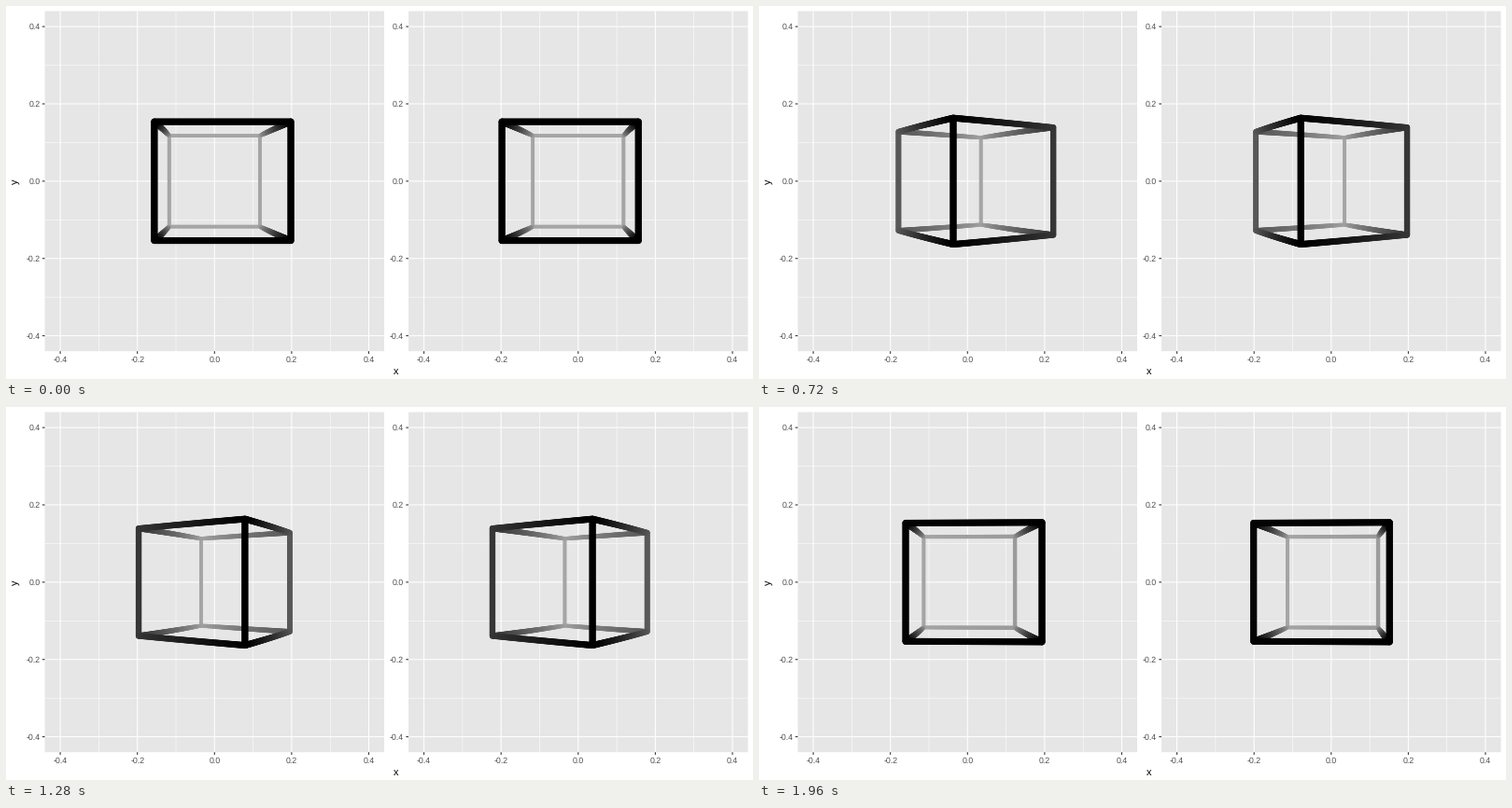
Write a matplotlib script that moves like this. It is 800x400 px and loops after 2000 ms.

```python
"""Stereo pair of a wireframe cube turning a quarter circle per loop."""
import itertools

import matplotlib.pyplot as plt
import numpy as np
from matplotlib.animation import FuncAnimation
from matplotlib.collections import LineCollection
from matplotlib.patches import Rectangle

plt.rcParams["font.family"] = "Liberation Sans"
plt.rcParams["text.hinting"] = "none"

W, H, DPI = 800, 400, 72          # at 72 dpi one point is one pixel
FRAMES, INTERVAL = 50, 40

# Panel layout in pixels, y pointing down
TOP, BOTTOM = 5.5, 370.2
CY, SY = (TOP + BOTTOM) / 2, (BOTTOM - TOP) / 0.88
CENTERS, SX = (223.3, 612.8), 413.0
HALF = 0.44 * SX

# Scene
CAMERA = 7.5                      # viewing distance in half edge lengths
EYE = 0.3175 * 0.44               # half the eye distance in data units
DEPTH = 0.15                      # strongest stereo depth
BACK_WIDTH, FRONT_WIDTH = 3.7, 7.0
BACK_GREY = 165 / 255
PIECES = 80

CORNERS = np.array(list(itertools.product((-1, 1), repeat=3)), float)
EDGES = [(i, j) for i, j in itertools.combinations(range(8), 2)
         if np.abs(CORNERS[i] - CORNERS[j]).sum() == 2]

fig = plt.figure(figsize=(W / DPI, H / DPI), dpi=DPI, facecolor="white")
ax = fig.add_axes([0, 0, 1, 1])
ax.set_xlim(0, W)
ax.set_ylim(H, 0)
ax.axis("off")


def rule(x0, y0, x1, y1, color, width, z):
    ax.plot([x0, x1], [y0, y1], color=color, lw=width, zorder=z,
            solid_capstyle="butt", snap=False)


def label(x, y, text, ha):
    ax.text(x, y, text, size=8.8, color="#4d4d4d", ha=ha, va="baseline")


def draw_panel(cx):
    left, right = cx - HALF, cx + HALF
    ax.add_patch(Rectangle((left, TOP), right - left, BOTTOM - TOP,
                           fc="#e6e6e6", ec="none", zorder=0, snap=False))
    for v in (-0.3, -0.1, 0.1, 0.3):
        x, y = cx + v * SX, CY - v * SY
        rule(left, y, right, y, "white", 0.53, 1)
        rule(x, TOP, x, BOTTOM, "white", 0.53, 1)
    for v in (-0.4, -0.2, 0.0, 0.2, 0.4):
        x, y = cx + v * SX, CY - v * SY
        rule(left, y, right, y, "white", 1.07, 2)
        rule(x, TOP, x, BOTTOM, "white", 1.07, 2)
        rule(left - 2.75, y, left, y, "#333333", 1.07, 2)
        rule(x, BOTTOM, x, BOTTOM + 2.75, "#333333", 1.07, 2)
        label(left - 4.95, y + 3.15, f"{v:.1f}", "right")
        label(x, 382, f"{v:.1f}", "center")


for center in CENTERS:
    draw_panel(center)
ax.text(418, 394.9, "x", size=11, ha="center", va="baseline")
ax.text(13.6, CY, "y", size=11, ha="center", va="baseline",
        rotation=90, rotation_mode="anchor")

cubes = []
for center in CENTERS:
    cube = LineCollection([], capstyle="round", zorder=3, snap=False)
    ax.add_collection(cube, autolim=False)
    cubes.append(cube)


def project(angle):
    """Projected corners as rows of x, y and nearness from 0 to 1."""
    x, y, z = CORNERS.T
    c, s = np.cos(angle), np.sin(angle)
    rx, rz = x * c + z * s, z * c - x * s
    scale = 1 / (CAMERA - rz)
    near = (rz - rz.min()) / (rz.max() - rz.min())
    return np.column_stack([rx * scale, y * scale, near])


def update(i):
    corners = project(np.pi / 2 * i / FRAMES)
    t = np.linspace(0, 1, PIECES + 1)[:, None]
    paths = np.array([corners[a] * (1 - t) + corners[b] * t for a, b in EDGES])
    x, y, near = np.moveaxis(paths, 2, 0)

    mid = np.clip((near[:, :-1] + near[:, 1:]).ravel() / 2, 0, 1)
    order = np.argsort(mid, kind="stable")
    mid = mid[order]
    widths = BACK_WIDTH + (FRONT_WIDTH - BACK_WIDTH) * np.sqrt(mid)
    grey = BACK_GREY * (1 - mid ** 0.8)
    colors = np.column_stack([grey, grey, grey])

    for cube, cx, eye in zip(cubes, CENTERS, (-EYE, EYE)):
        px = cx + SX * (x + (x - eye) * DEPTH * near)
        pts = np.stack([px, CY - SY * y], axis=2)
        pieces = np.stack([pts[:, :-1], pts[:, 1:]], axis=2).reshape(-1, 2, 2)
        cube.set_segments(pieces[order])
        cube.set_linewidths(widths)
        cube.set_color(colors)
    return cubes


anim = FuncAnimation(fig, update, frames=FRAMES, interval=INTERVAL,
                     repeat=True, repeat_delay=0, blit=False)
plt.show()
```
